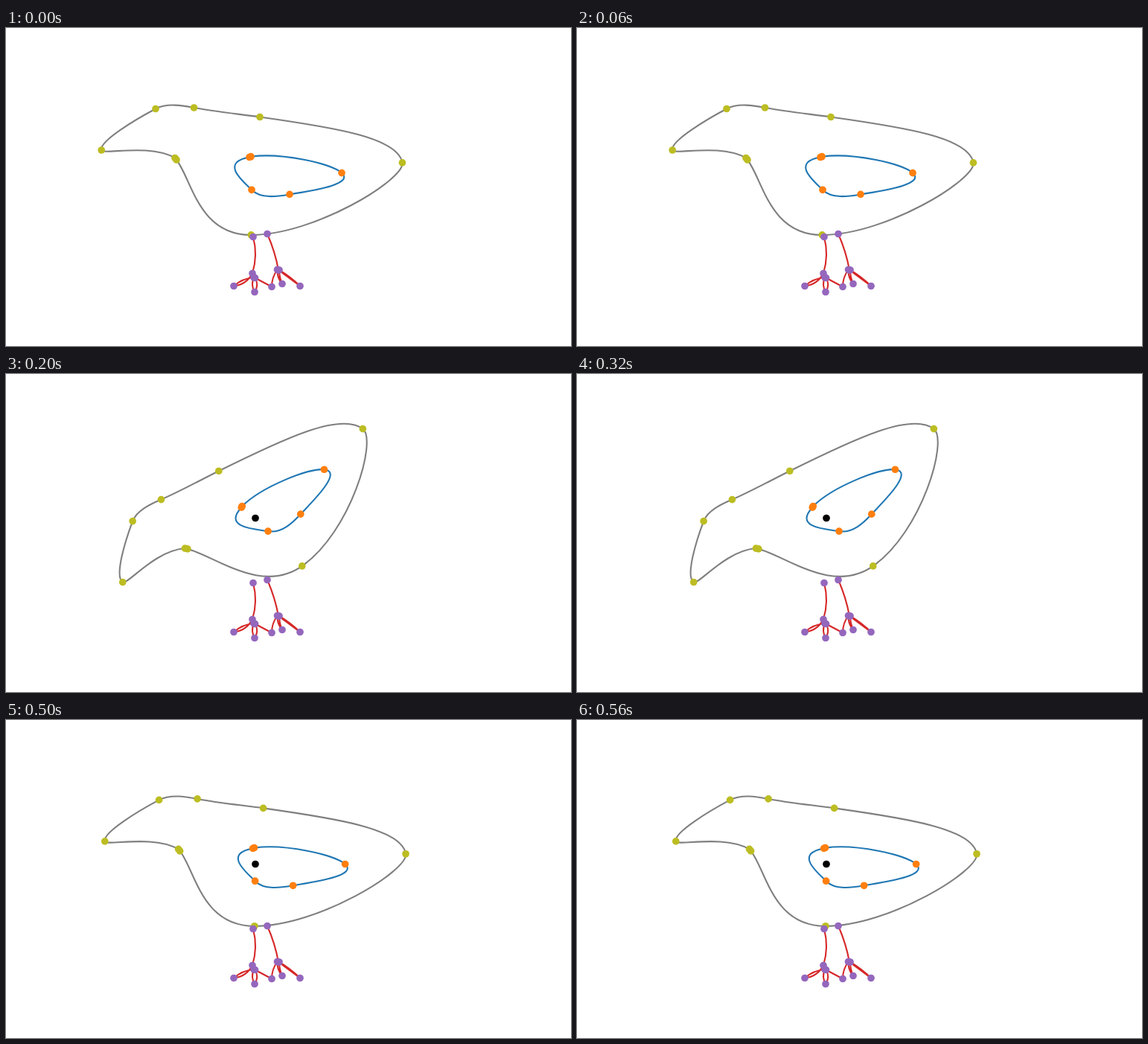
An HTML page that plays this animation: 759x427 px, repeating every 600 ms.

```html
<!DOCTYPE html>
<html lang="en">
<head>
<meta charset="utf-8">
<title>Rocking bird</title>
<style>
html, body { margin: 0; width: 100%; height: 100%; overflow: hidden; background: #fff; }
svg { display: block; width: 759px; height: 427px; }
path { fill: none; stroke-width: 2.08; stroke-linejoin: round; stroke-linecap: square; }
</style>
</head>
<body>
<svg viewBox="0 0 759 427">
  <path id="body" stroke="#7f7f7f"/>
  <path id="wing" stroke="#1f77b4"/>
  <path id="legs" stroke="#d62728"/>
  <g id="bodyDots" fill="#bcbd22"></g>
  <g id="wingDots" fill="#ff7f0e"></g>
  <g id="legsDots" fill="#9467bd"></g>
  <circle id="pivot" cx="335" cy="193.5" r="4.85"/>
</svg>
<script>
const $ = id => document.getElementById(id);
const PIVOT = [335, 193.5];
const ASPECT = 0.842; // vertical to horizontal axis scale
const STEP = 100, STEPS = 6, TILT = 20;

// A point the outline runs through: heading in degrees, and handle
// lengths before and after it as parts of the neighbouring chords.
const knot = (x, y, heading, before = 1 / 3, after = before) =>
  ({ x, y, heading, before, after });

const body = [
  knot(227, 174.5, -150, 0.4),
  knot(128.2, 164, -105, 0.07, 0.135),
  knot(201, 108.5, -28),
  knot(252.5, 107, 11, 0.3),
  knot(341, 119.5, 8, 0.33, 0.5),
  knot(532.4, 180.9, 81, 0.17, 0.1),
  knot(329.3, 277.9, 180, 0.38, 0.5),
  knot(229, 177, -128, 0.24)
];
const wing = [
  knot(329, 172.7, -8),
  knot(451, 194.6, 42, 0.15, 0.32),
  knot(381, 223.4, 170),
  knot(330, 217.3, -134),
  knot(327, 173.5, -10, 0.95)
];

// One line down the first leg, around the toes and up the second;
// the third value is the sideways bow of the stroke that follows.
const legs = [
  [332, 280.5, 7], [331, 329.5, 8], [306, 346.5, 5], [333, 335, -5],
  [334, 354.5, -6], [334.5, 335.5, 0], [357, 347.5, 4], [364.5, 324.5, -4],
  [371, 343.5, 2], [367, 325, 2], [395, 346.5, 0], [366, 325, -3],
  [351, 276.5, 0]
];

function handle(p, length) {
  const a = p.heading * Math.PI / 180;
  return [p.x + length * Math.cos(a), p.y + length * Math.sin(a)];
}

// Knot, handle, handle, knot, ... of a chain of cubic curves
function chain(knots) {
  const pts = [[knots[0].x, knots[0].y]];
  for (let i = 1; i < knots.length; i++) {
    const p = knots[i - 1], q = knots[i];
    const chord = Math.hypot(q.x - p.x, q.y - p.y);
    pts.push(handle(p, chord * p.after), handle(q, -chord * q.before), [q.x, q.y]);
  }
  return pts;
}

function bowed(pts) {
  let d = `M${pts[0][0]} ${pts[0][1]}`;
  for (let i = 1; i < pts.length; i++) {
    const [x, y, bow] = pts[i - 1], [u, v] = pts[i];
    const k = bow / Math.hypot(u - x, v - y);
    d += `Q${(x + u) / 2 + k * (v - y)} ${(y + v) / 2 - k * (u - x)} ${u} ${v}`;
  }
  return d;
}

function turn([px, py], { tilt, shift }) {
  const a = tilt * Math.PI / 180;
  const x = px + shift[0] - PIVOT[0];
  const y = (py + shift[1] - PIVOT[1]) / ASPECT;
  return [
    PIVOT[0] + x * Math.cos(a) + y * Math.sin(a),
    PIVOT[1] + (y * Math.cos(a) - x * Math.sin(a)) * ASPECT
  ];
}

function drawDots(id, pts) {
  $(id + "Dots").innerHTML =
    pts.map(([x, y]) => `<circle cx="${x}" cy="${y}" r="4.85"/>`).join("");
}

function drawShape(id, pts, pose) {
  const p = pts.map(q => turn(q, pose));
  $(id).setAttribute("d", `M${p[0]}C${p.slice(1).join(" ")}Z`);
  drawDots(id, p.filter((_, i) => i % 3 === 0));
}

const shapes = { body: chain(body), wing: chain(wing) };
$("legs").setAttribute("d", bowed(legs));
drawDots("legs", legs);

// The bird tips forward in steps, rests, and tips back
function draw(time) {
  const step = Math.floor(time / STEP) % STEPS;
  const pose = {
    tilt: TILT * Math.min(step, 2, STEPS - 1 - step),
    shift: step ? [4.6, -1.1] : [0, 0]
  };
  for (const id in shapes) drawShape(id, shapes[id], pose);
  $("pivot").style.display = step < 2 ? "none" : "";
}

let start;
function tick(now) {
  start ??= now;
  draw(Math.max(0, now - start));
  requestAnimationFrame(tick);
}
draw(0);
requestAnimationFrame(tick);
</script>
</body>
</html>
```
